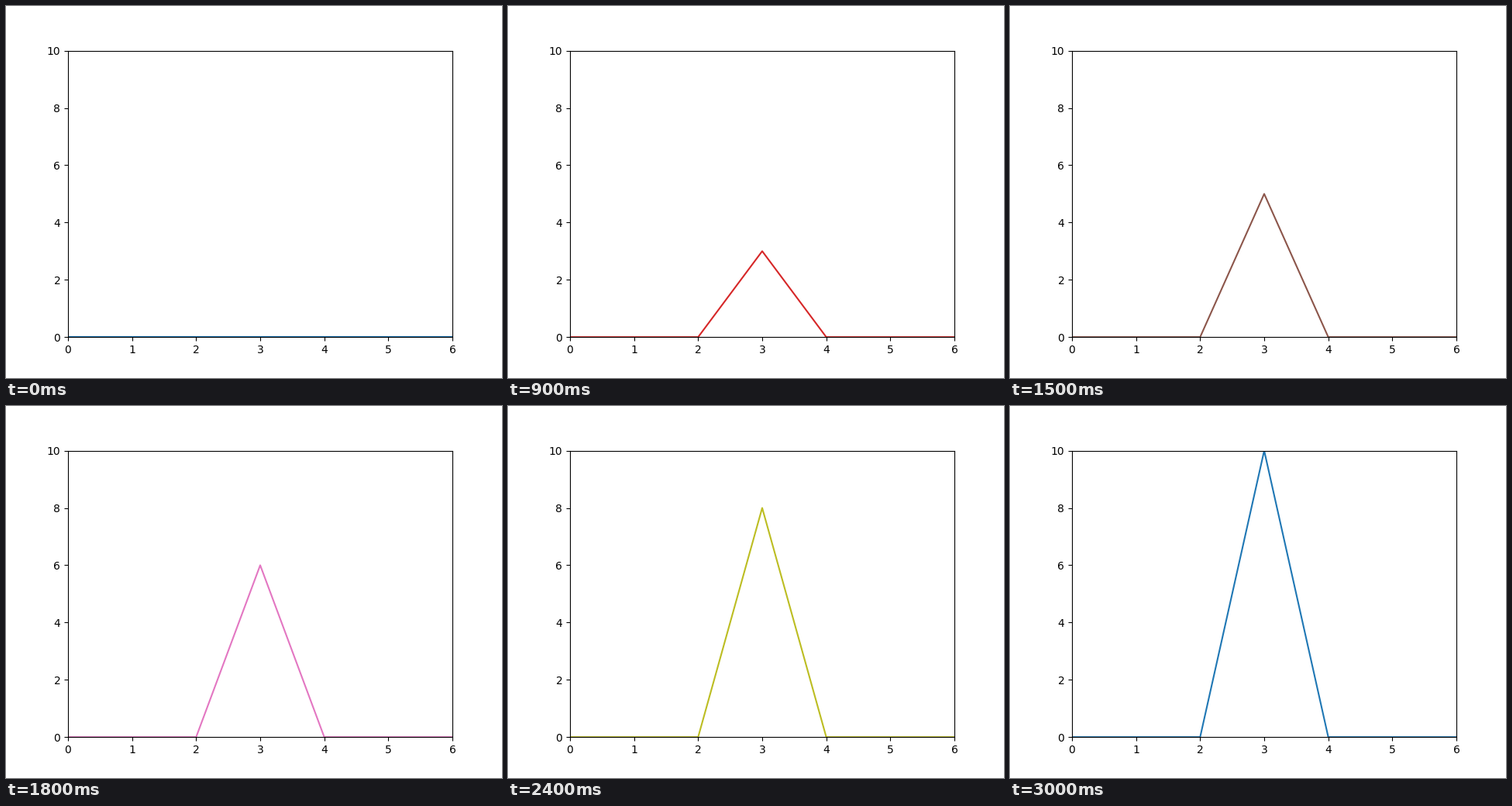
A matplotlib script for the animation above (3300 ms loop, 640 px wide and 480 px high).

```python
import matplotlib.pyplot as plt
from matplotlib.animation import FuncAnimation

FRAMES = 11
INTERVAL = 300  # ms

fig, ax = plt.subplots(figsize=(6.4, 4.8), dpi=100)
ax.set_xlim(0, 6)
ax.set_ylim(0, 10)

x = range(7)
line, = ax.plot(x, [0] * 7, color="C0")


def update(step):
    """Raise the peak by one unit per step and take the next cycle colour."""
    line.set_ydata([step if xi == 3 else 0 for xi in x])
    line.set_color(f"C{step % 10}")
    return line,


anim = FuncAnimation(fig, update, frames=FRAMES, interval=INTERVAL,
                     repeat=True, repeat_delay=0, blit=False)
plt.show()
```
